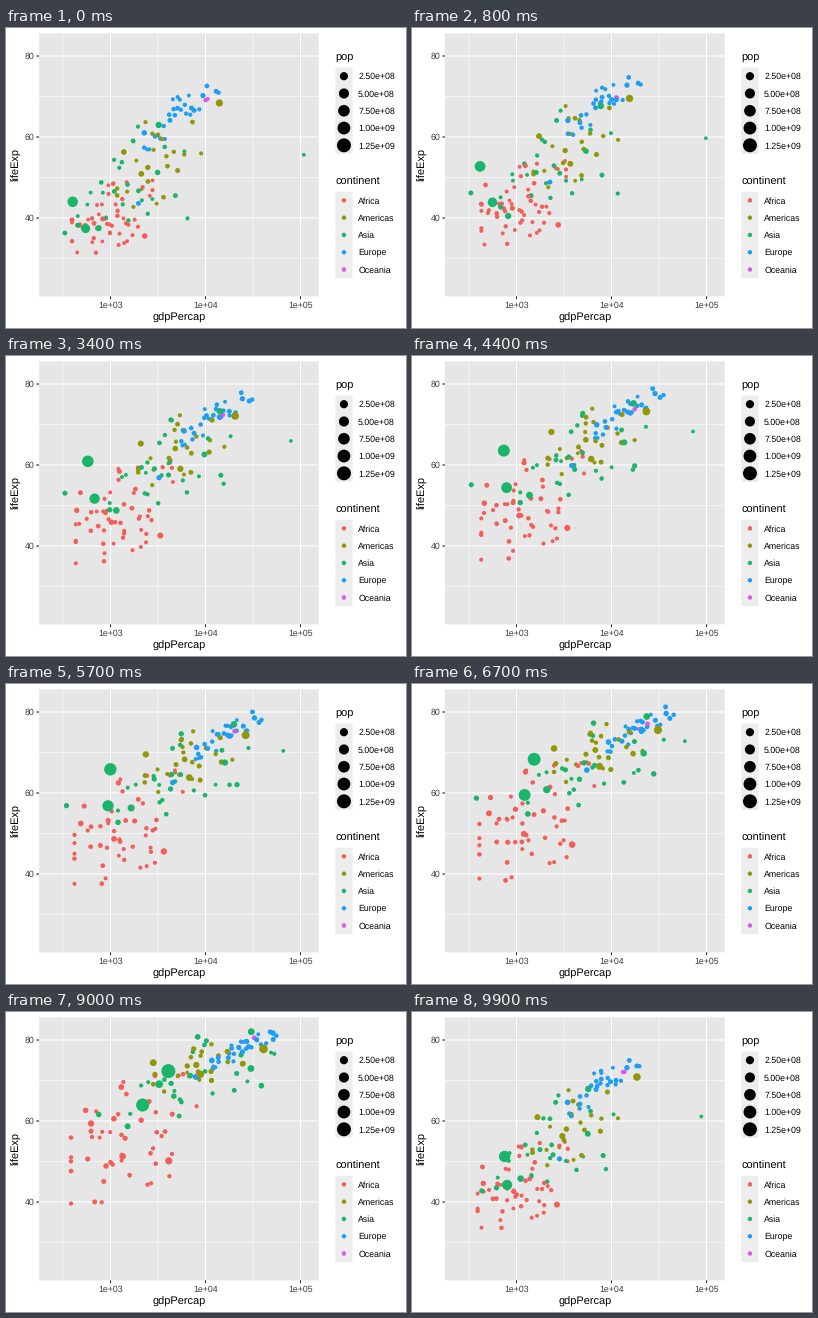
A matplotlib script for the animation above (10000 ms loop, 400 by 300 pixels).

```python
import numpy as np
import matplotlib.pyplot as plt
from matplotlib.animation import FuncAnimation
from matplotlib.patches import Circle, Rectangle

W, H, DPI = 400, 300, 72
FRAMES, INTERVAL = 100, 100
STATES = 12                         # five-year steps
MOVE = 4                            # frames spent moving into a state
T = np.linspace(0, 1, STATES)
COLORS = {"Africa": "#F35E5A", "Americas": "#929705", "Asia": "#18B56A",
          "Europe": "#1B9EF3", "Oceania": "#DF53F0"}
LEFT, RIGHT, TOP, BOTTOM = 33.1, 312.7, 5.5, 268.4

plt.rcParams["font.family"] = "Liberation Sans"
plt.rcParams["text.hinting"] = "none"
rng = np.random.default_rng(5)


def px(log_gdp):
    return 104.5 + 95 * (log_gdp - 3)


def py(life):
    return 190 - 4.05 * (life - 40)


def diameter(pop):
    """Dot diameter in pixels for a population in millions."""
    size = 1 + 5 * np.sqrt(np.clip(pop / 1318.7, 0, 1))
    return 0.75 * (size * 2.845 + 0.94) + 0.7


def ease(span, power=1.0):
    start, end = span
    return start + (end - start) * T ** power


def arrival(k):
    """Frame at which state k is reached; a few early states last longer."""
    return 8 * k + min(max(k - 1, 0), 4)


# ---- data: one (x, y, diameter) track over all states per dot ----
tracks, dot_colors = [], []


def add(group, log_gdp, life, pop, growth):
    tracks.append((px(log_gdp), py(life), diameter(pop * growth ** T)))
    dot_colors.append(COLORS[group])


def path(group, pop, growth, gdp, life, gdp_power=1.0, life_power=0.7):
    add(group, ease(np.log10(gdp), gdp_power), ease(life, life_power), pop, growth)


def wander(start, amount):
    """A dot's rank in its group, drifting slowly with small wobbles."""
    z = start + rng.normal(0, amount) * T + np.cumsum(rng.normal(0, 0.05, STATES))
    return np.clip(z / np.sqrt(1 + (amount * T) ** 2), -1.5, 1.9)


def crowd(group, count, log_gdp, gdp_sd, life, life_sd, rho, pop, growth):
    """Dots scattered about a group trend, richer ones living longer."""
    p = (np.arange(count) + 0.5) / count
    ranks = np.clip(np.log(p / (1 - p)) / 1.7, -1.6, 1.9)
    for rank, other in zip(ranks, rng.permutation(ranks)):
        zx = wander(rank, 0.35)
        zy = rho * zx + np.sqrt(1 - rho ** 2) * wander(other, 0.4)
        add(group, ease(log_gdp, 0.55) + ease(gdp_sd) * zx,
            np.minimum(ease(life, 0.65) + ease(life_sd, 0.7) * zy, 82),
            min(pop * np.exp(rng.normal(0, 1.1)), 55), growth)


crowd("Africa", 52, (2.97, 3.18), (.25, .4), (39.3, 55), (5, 9), .4, 3, 3.7)
crowd("Americas", 23, (3.46, 3.88), (.26, .28), (53, 73.5), (8.8, 4), .65, 4, 2.5)
crowd("Asia", 25, (3.15, 3.88), (.33, .46), (47.5, 71), (8.5, 6.5), .6, 6, 2.9)
crowd("Europe", 29, (3.7, 4.38), (.23, .2), (65.3, 77.8), (4.4, 2.3), .82, 8, 1.35)

# The largest populations and the dots that stray from their group
path("Asia", 556, 2.37, (400, 4959), (44, 73), 1.8, 0.5)
path("Asia", 372, 2.98, (547, 2452), (37.4, 64.7), 1.8, 0.6)
path("Asia", 82, 2.7, (750, 3541), (37.5, 70.6), 1.2, 1)
path("Asia", 86, 1.5, (3217, 31656), (63, 82.6), 0.4, 0.6)
path("Asia", 0.2, 12, (108382, 47307), (55.6, 77.6), 0.9)
path("Asia", 20, 2.4, (331, 944), (36.3, 62.1), 6, 0.4)
path("Asia", 4, 7, (6460, 21655), (39.9, 72.8), 0.3)
path("Americas", 158, 1.9, (13990, 42952), (68.4, 78.2), 1, 0.9)
path("Americas", 57, 3.3, (2109, 9066), (50.9, 72.4), 0.4, 0.9)
path("Europe", 22, 3.2, (1969, 8458), (43.6, 71.8))
path("Oceania", 9, 2.3, (10039, 34435), (69.1, 81.2), 1, 1.2)
path("Oceania", 2, 2, (10556, 25185), (69.4, 80.2), 1, 1.5)

order = np.argsort([np.mean(d) for _, _, d in tracks])   # big dots on top
data = np.array(tracks)[order].transpose(2, 0, 1)        # state, dot, (x, y, d)
dot_colors = [dot_colors[i] for i in order]

# ---- fixed parts ----
fig = plt.figure(figsize=(W / DPI, H / DPI), dpi=DPI, facecolor="white")
ax = fig.add_axes((0, 0, 1, 1))
ax.set_xlim(0, W)
ax.set_ylim(H, 0)
ax.axis("off")


def box(x, y, w, h, color):
    ax.add_patch(Rectangle((x, y), w, h, color=color, lw=0, zorder=0, snap=False))


def line(xs, ys, color="white", width=1.07):
    ax.plot(xs, ys, color=color, lw=width, zorder=1, snap=False,
            solid_capstyle="butt")


def label(x, y, text, size=8.8, color="black", **kw):
    ax.text(x, y, text, fontsize=size, color=color, va="baseline", **kw)


def legend(title, baseline, first, entries):
    label(329.3, baseline, title, 11)
    for i, (text, color, d) in enumerate(entries):
        y = first + 17.28 * i
        box(329.3, y - 8.64, 17.28, 17.28, "#EDEDED")
        ax.add_patch(Circle((337.94, y), d / 2, color=color, lw=0, zorder=2))
        label(352.1, y + 3.2, text)


box(LEFT, TOP, RIGHT - LEFT, BOTTOM - TOP, "#E6E6E6")
for v in (2.5, 3.5, 4.5):
    line((px(v), px(v)), (TOP, BOTTOM), width=0.53)
for v in (30, 50, 70):
    line((LEFT, RIGHT), (py(v), py(v)), width=0.53)
for v in (3, 4, 5):
    line((px(v), px(v)), (TOP, BOTTOM))
    line((px(v), px(v)), (BOTTOM, BOTTOM + 2.75), "#262626")
    label(px(v), 279.6, f"1e+0{v}", color="#3D3D3D", ha="center")
for v in (40, 60, 80):
    line((LEFT, RIGHT), (py(v), py(v)))
    line((LEFT - 2.75, LEFT), (py(v), py(v)), "#262626")
    label(28.2, py(v) + 3.2, str(v), color="#3D3D3D", ha="right")
label((LEFT + RIGHT) / 2, 292.8, "gdpPercap", 11, ha="center")
label(13.3, (TOP + BOTTOM) / 2, "lifeExp", 11, ha="center", rotation=90,
      rotation_mode="anchor")

legend("pop", 33, 48.2, [(f"{m * 1e6:.2e}", "black", diameter(m))
                         for m in range(250, 1251, 250)])
legend("continent", 157, 172.4, [(g, c, 4.4) for g, c in COLORS.items()])

dots = ax.scatter(data[0, :, 0], data[0, :, 1], s=data[0, :, 2] ** 2,
                  c=dot_colors, lw=0, zorder=3)


def update(frame):
    k = max(i for i in range(STATES) if arrival(i) <= frame)
    u = max(0, (frame - arrival(k + 1) + MOVE) / MOVE)
    now = (1 - u) * data[k] + u * data[(k + 1) % STATES]
    dots.set_offsets(now[:, :2])
    dots.set_sizes(now[:, 2] ** 2)
    return (dots,)


anim = FuncAnimation(fig, update, frames=FRAMES, interval=INTERVAL,
                     repeat=True, repeat_delay=0, blit=False)
plt.show()
```
